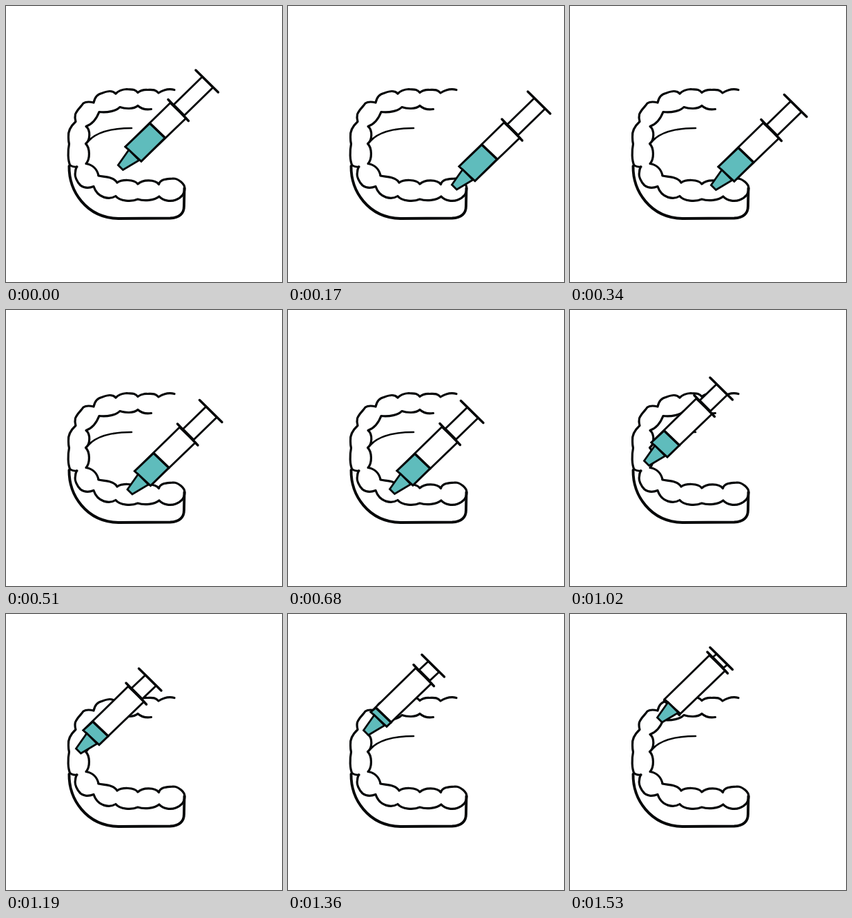
Recreate the animation shown at these times as an HTML page. Size 400 by 400 pixels, loop 1700 ms.

```html
<!DOCTYPE html>
<html lang="en">
<head>
<meta charset="utf-8">
<title>Filling a dental tray</title>
<style>
html, body { margin: 0; width: 100%; height: 100%; overflow: hidden; background: #fff; }
svg { display: block; width: 100%; height: 100%; }
path { stroke: #050708; stroke-linecap: round; stroke-linejoin: round; }
.line { fill: none; stroke-width: 3.2; }
.thin { fill: none; stroke-width: 2.7; }
.gum { fill: none; stroke-width: 3.9; }
.body { fill: #fff; stroke-width: 2.9; stroke-linejoin: miter; }
.gel { fill: #5fbcbc; stroke-width: 2.8; stroke-linejoin: miter; }
.bar { fill: none; stroke-width: 3.5; }
</style>
</head>
<body>
<svg viewBox="0 0 400 400">
  <path class="gum" d="M91.500 232C91 268 116 307 163 308L238 307.500C252 307 258 300 258 290L258.500 264"/>
  <!-- outer edge of the upper arch -->
  <path class="line" d="M244 121.500Q233 118.500 221 126C216 120.500 212 121.500 205 121.500Q197 121 191 125.500
    C186 119.500 181 121.500 175 120.500Q165 121 159 127C154 122 148 123 140 126C132 128 129 132 127 140
    C121 138.500 115 139 112 141C109 146 103 150 100.500 157C99.500 161 100 164 101 167.500
    C95 173 89.500 180 90.500 190C90.500 195 91 198 91.500 200C89.500 210 89.500 224 93 231Q98 234 103 233"/>
  <!-- inner edge of the arch -->
  <path class="line" d="M210.500 149.500Q199 151.500 191 144.500C185 150 172 149 165 146.500
    C160 152 147 155 135 153.500C131 164 126 171 116 174.500C123 180 122 195 115.500 199.500
    C122 206 122 222 116 228.500C126 230 132 237 134 245.500"/>
  <path class="thin" id="tongue" d="M119 196C130 184 152 177 182 177"/>
  <!-- lower row -->
  <path class="line" d="M134 246C142 248 156 247 161 256C168 251 186 251 191 258C198 251 216 251 221.500 258.500
    C224 250 234 251 242 250C250 250 259 258 259 264C259 272 254 278 246 281C238 284 227 282 222 276
    C215 282 200 283 191 280C182 284 165 283 159 275.500C150 281 133 279 127 261.500
    C121 264 114 264.500 108 260C103 255 99 247 100.500 241Q100.500 237 102.500 233"/>
  <g id="syringe">
    <path class="body" id="rod"/>
    <path class="bar" id="thumb"/>
    <path class="body" d="M173 204L238 140.500L261 162.500L196 225Z"/>
    <path class="gel" id="gel"/>
    <path class="bar" id="piston"/>
    <path class="gel" d="M178 208.500L162.500 230.500L169.500 237.500L193 223.500Z"/>
    <path class="bar" d="M235 135.500L264.500 166.500"/>
  </g>
</svg>
<script>
const STEP = 170;
// shift x, shift y, plunger travel, tongue hidden
const poses = [
  [0, 0, 0], [75, 28.5, 2.5], [42, 29, 6.5], [13.5, 29.5, 8], [-15, 29, 9.5],
  [-40, 14.5, 13], [-55, -12, 17], [-61, -35.5, 21.5, true], [-53, -62, 28], [-36, -80.5, 36]
];
const el = id => document.getElementById(id);
const setPath = (id, d) => el(id).setAttribute("d", d);

function draw(time) {
  const [x, y, push, hideTongue] = poses[Math.floor(time / STEP) % poses.length];
  const at = (px, py) => `${px - push} ${py + push}`;
  el("syringe").setAttribute("transform", `translate(${x} ${y})`);
  el("tongue").style.visibility = hideTongue ? "hidden" : "visible";
  setPath("rod", `M243 143L${at(284.5, 102.5)}L${at(300, 118)}L258.5 158.5Z`);
  setPath("thumb", `M${at(275, 93)}L${at(307.5, 125)}`);
  setPath("piston", `M${at(208.5, 170)}L${at(230.5, 191)}`);
  setPath("gel", push < 35 ? `M173 204L${at(208.5, 170)}L${at(230.5, 191)}L196 225Z` : "");
}

const start = performance.now();
function tick() {
  draw(performance.now() - start);
  requestAnimationFrame(tick);
}
tick();
</script>
</body>
</html>
```
